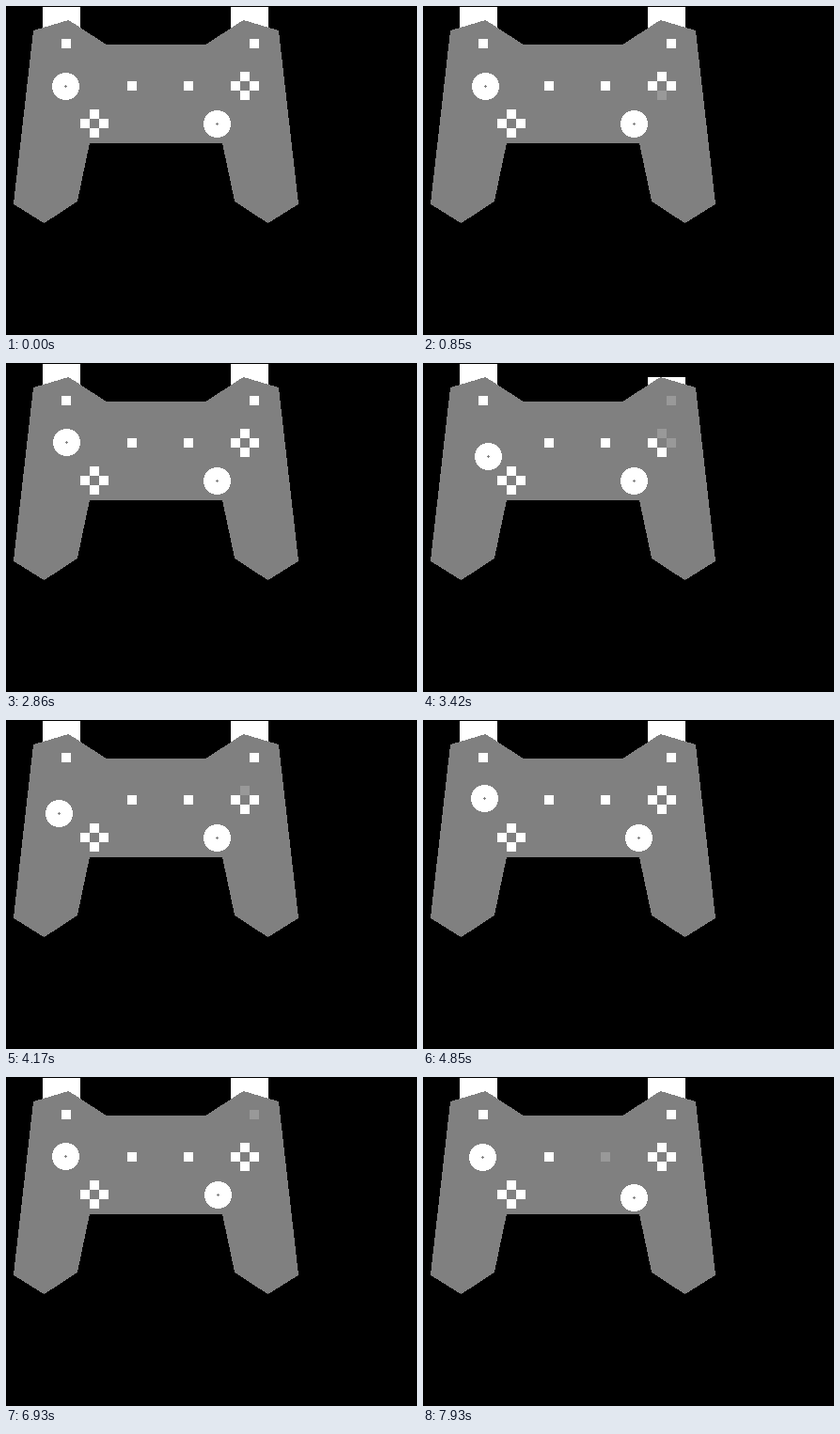
Write an HTML page that moves like this. It is 437 px wide and 350 px high and loops after 8000 ms.

```html
<!DOCTYPE html>
<html lang="en">
<head>
<meta charset="utf-8">
<title>Gamepad input</title>
<style>
  html, body { margin: 0; width: 100%; height: 100%; overflow: hidden; background: #000; }
  svg { display: block; fill: #fff; shape-rendering: crispEdges; }
  .body { fill: #808080; stroke: #808080; stroke-linejoin: bevel; }
  .down { fill: #999; }
  .mark { fill: #808080; }
</style>
</head>
<body>
<svg width="437" height="350" viewBox="0 0 437 350">
  <defs>
    <g id="stick"><circle r="14.5"/><path class="mark" d="M-1.5-.5h3v1h-3zM-.5-1.5h1v3h-1z"/></g>
  </defs>
  <rect id="l2" x="39" y="1" width="40" height="25"/>
  <rect id="r2" x="239" y="1" width="40" height="25"/>
  <path class="body" transform="translate(.5 .5)" d="M29 26 66 15 106 41H212L252 15 289 26 310 210 278 230 243 207 230 145H88L75 207 40 230 8 210Z"/>
  <g id="buttons"></g>
  <use id="left" href="#stick"/>
  <use id="right" href="#stick"/>
</svg>
<script>
const LOOP = 8000;
const TICK = 80;    // sticks and triggers are sampled at this interval
const TAP = 240;    // usual length of a button press
const MASH = 750;   // rhythm of repeated presses
const RAMP = 160;   // time to push a stick or trigger all the way
const byId = id => document.getElementById(id);

function addButton(id, x, y) {
  const el = document.createElementNS('http://www.w3.org/2000/svg', 'rect');
  Object.entries({ id, x: x - 5, y: y - 5, width: 10, height: 10 })
    .forEach(([name, value]) => el.setAttribute(name, value));
  byId('buttons').append(el);
}

function addDiamond(prefix, x, y) {
  ['right', 'bottom', 'left', 'top'].forEach((side, i) => {
    const angle = i * Math.PI / 2;
    addButton(prefix + side, x + Math.round(10 * Math.cos(angle)), y + Math.round(10 * Math.sin(angle)));
  });
}

addButton('l1', 64, 40);
addButton('r1', 264, 40);
addButton('select', 134, 85);
addButton('start', 194, 85);
addDiamond('face-', 254, 85);
addDiamond('pad-', 94, 125);

const tap = (t, start, hold = TAP) => t >= start && t < start + hold;
const mash = (t, start, count) => tap(t, start, count * MASH) && (t - start) % MASH < TAP;

const pressed = t => ({
  'l1': tap(t, 1240) || tap(t, 4320) || tap(t, 6320, 310),
  'r1': mash(t, 2600, 2) || tap(t, 6850, 530),
  'start': tap(t, 7680, 320),
  'face-top': mash(t, 2550, 3) || tap(t, 5630, 460),
  'face-left': mash(t, 2340, 2),
  'face-right': mash(t, 2600, 2) || tap(t, 5630),
  'face-bottom': tap(t, 850) || mash(t, 2900, 2)
});

// Eases from 0 to 1 after `on` and back to 0 before `off`.
function lean(t, on, off) {
  const p = Math.min(1, Math.max(0, Math.min(t - on, off - t) / RAMP));
  return p * p * (3 - 2 * p);
}

const push = (t, on, off, dx, dy) => [dx, dy].map(d => d * lean(t, on, off));
const sum = (...moves) => moves.reduce(([ax, ay], [bx, by]) => [ax + bx, ay + by]);

function leftStick(t) {
  if (t >= 3120 && t < 4700) {
    const angle = (67 + 41 * (t - 3360) / TICK) * Math.PI / 180;
    return [15.4 * Math.cos(angle), 15.4 * Math.sin(angle)];
  }
  return sum(
    push(t, 240, 760, 12, 9),
    push(t, 640, 960, 3, 0),
    push(t, 1300, 3120, 1, -1),
    push(t, 4600, 5200, 2, -2),
    push(t, 5160, 5760, 0, -15),
    push(t, 6240, 7000, 0, -1)
  );
}

const rightStick = t => sum(
  push(t, -80, 320, 0, -1),
  push(t, 4690, 5360, 6, 0),
  push(t, 5200, 7440, 1, 0),
  push(t, 7360, 8400, 0, 1),
  push(t, 7600, 8400, 0, 2)
);

function place(id, x, y, offset) {
  const [dx, dy] = offset.map(Math.round);
  byId(id).setAttribute('transform', `translate(${x + dx} ${y + dy})`);
}

const squeeze = (id, amount) => byId(id).setAttribute('y', 1 + Math.round(15 * amount));

const start = performance.now();
function draw(now) {
  const t = Math.max(0, now - start) % LOOP;
  const sampled = Math.floor(t / TICK) * TICK;
  for (const [id, down] of Object.entries(pressed(t))) byId(id).classList.toggle('down', down);
  place('left', 63.5, 85.5, leftStick(sampled));
  place('right', 224.5, 125.5, rightStick(sampled));
  squeeze('l2', lean(sampled, 1840, 2320));
  squeeze('r2', lean(sampled, 1600, 1920) + lean(sampled, 3220, 3620));
  requestAnimationFrame(draw);
}
draw(start);
</script>
</body>
</html>
```
